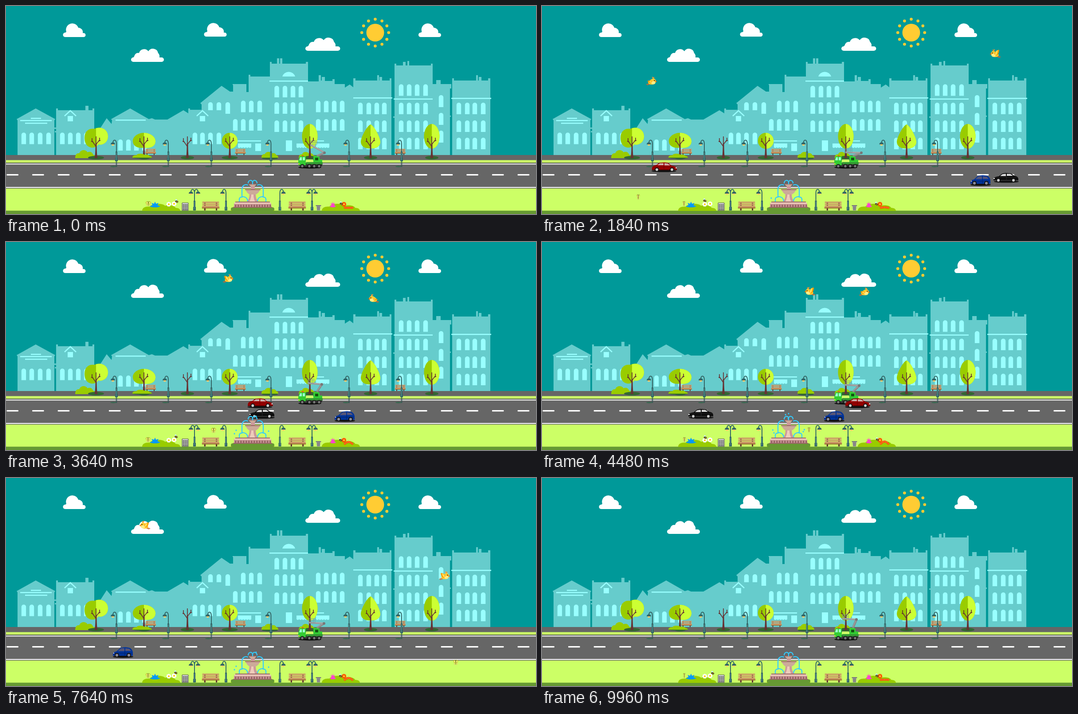
Animation, 1195 px wide and 469 px high, one loop 10 s. Source, as an HTML page with a canvas:

```html
<!DOCTYPE html>
<html lang="en">
<head>
<meta charset="utf-8">
<title>City street</title>
<style>
html, body { margin: 0; width: 100%; height: 100%; overflow: hidden; background: #099; }
canvas { display: block; }
</style>
</head>
<body>
<canvas id="stage" width="1195" height="469"></canvas>
<script>
const c = document.getElementById('stage').getContext('2d');
const LOOP = 10000, TAU = Math.PI * 2;
const WALL = '#6cc', GLASS = '#9ff', LEAF = '#9c0', LIME = '#cf3', BARK = '#633',
      IRON = '#366', SHADE = '#363', WATER = '#3cf';

// Drawing helpers
const fill = (color, d) => { c.fillStyle = color; c.fill(new Path2D(d)); };
const line = (color, w, d) => { c.strokeStyle = color; c.lineWidth = w; c.stroke(new Path2D(d)); };
const rect = (color, x, y, w, h) => { c.fillStyle = color; c.fillRect(x, y, w, h); };
function oval(color, x, y, rx, ry = rx, turn = 0) {
  c.fillStyle = color;
  c.beginPath();
  c.ellipse(x, y, rx, ry, turn, 0, TAU);
  c.fill();
}
function at(x, y, draw, sx = 1, sy = Math.abs(sx)) {
  c.save();
  c.translate(x, y);
  c.scale(sx, sy);
  draw();
  c.restore();
}
function petals(color, x, y, n, reach, r) {
  for (let i = 0; i < n; i++) {
    const a = i * TAU / n - Math.PI / 2;
    oval(color, x + reach * Math.cos(a), y + reach * Math.sin(a), r);
  }
}

// Smooth path through keys [time, ...values]
function along(keys, t) {
  let i = 0;
  while (i < keys.length - 2 && t >= keys[i + 1][0]) i++;
  const a = keys[i], b = keys[i + 1], p = keys[i - 1] || a, q = keys[i + 2] || b;
  const span = b[0] - a[0], u = (t - a[0]) / span, v = 1 - u;
  return a.slice(1).map((_, k) => {
    const j = k + 1;
    const m = (b[j] - p[j]) / (b[0] - p[0]) * span, n = (q[j] - a[j]) / (q[0] - a[0]) * span;
    return v * v * (1 + 2 * u) * a[j] + u * u * (3 - 2 * u) * b[j] + u * v * v * m - u * u * v * n;
  });
}

// Sky
function smallCloud() {
  fill('#fff', 'M5,29A5,5 0 0 1 4,19Q6,19 7,17A14,14 0 0 1 34,8A10,10 0 0 1 44,20H46A4.5,4.5 0 0 1 46,29Z');
}
function wideCloud() {
  fill('#fff', 'M5,29A5,5 0 0 1 5,19Q7,18 8,14Q11,8 18,9A12,12 0 0 1 39,5A12,12 0 0 1 61,9Q65,13 64,19H69A5,5 0 0 1 69,29Z');
}
function sky() {
  rect('#099', 0, 0, 1195, 336);
  [[129, 41], [447, 40], [930.5, 41]].forEach(([x, y]) => at(x, y, smallCloud));
  at(282, 97, wideCloud);
  at(675, 72, wideCloud, 1.06, 1);
  oval('#fc3', 832.5, 60, 20);
  petals('#fc3', 832.5, 60, 12, 30.3, 3.3);
}

// Buildings
function windows(xs, ys, h = 26) {
  c.fillStyle = GLASS;
  c.beginPath();
  for (const x of xs) for (const y of ys) c.roundRect(x - 5.2, y, 10.4, h, [5, 5, 0, 0]);
  c.fill();
}
function dormer(x) {
  line(GLASS, 2.5, `M${x - 13},248L${x},236L${x + 13},248`);
  rect(GLASS, x - 6, 248, 12, 12);
}
function city() {
  fill(WALL, 'M26,336V258L24,255L67,231L111,255L109,258V336Z');
  fill(WALL, 'M113,336V285H110V282H113V277H109V274H113V231H117V235H179V225H186V235H195V231H199V336Z');
  fill(WALL, 'M199,336V284H207L227,253L238,266L239,258L237,255L280,231L322,255L329,253L336,256H364L400,235L411,242V231H415V234H441V336Z');
  fill(WALL, 'M441,336V222L438,219L486,180L505,193H512V178H511V176H542V194H547V155H551V159H595V126H599V130H611V118H616V130H618V118H623V130H676V126H681V170H705V156H710V168H712V160H719V169H736V165H741V176H764V184L775,177L784,184V336Z');
  fill(WALL, 'M783,336V163H788V168H837V156H841V168H842V160H848V168H865V163H869V336Z');
  fill(WALL, 'M876,336V252H873V249H876V130H880V134H895V126H901V134H905V124H909V134H958V130H962V176H970V167H980V176H1004V186H1001V247H1003V250H1001V336Z');
  fill(WALL, 'M1006,336V163H1010V168H1060V156H1064V168H1066V160H1072V168H1087V163H1092V336Z');

  [[56, 252, 23], [32, 257, 71], [43, 263, 50], [247, 256, 68], [594, 168, 87],
   [783, 206, 88], [874, 208.5, 88], [1004, 207, 90], [522, 303, 53], [697, 303, 20]]
    .forEach(([x, y, w]) => rect(GLASS, x, y, w, 2.6));
  dormer(145);
  dormer(443);
  fill(GLASS, 'M623,159A15,14 0 0 1 652,159Z');

  windows([40, 58, 77, 96, 127, 145, 163, 181, 426, 443, 461, 480], [285.5]);
  windows([258, 276, 294, 312], [301], 25);
  windows([461, 480], [217], 18);
  windows([500], [217]);
  windows([535, 553, 572], [213.5]);
  windows([517, 535, 553, 572], [255]);
  windows([610.5, 629, 647, 665], [180, 217, 258]);
  windows([704, 722, 740, 758], [213.5, 255]);
  windows([799, 818, 836, 853], [218, 258, 297]);
  windows([891, 909, 927, 946], [176.5, 218, 258, 297]);
  windows([981], [201, 241, 281], 27);
  windows([1021, 1040, 1057, 1076], [218, 258, 297]);

  rect(GLASS, 562, 310, 13, 17);
  rect(GLASS, 631, 303, 14, 24);
  for (const x of [523, 655, 699]) {
    rect(GLASS, x, 310, 30, 7);
    for (let i = 0; i < 5; i++) oval(GLASS, x + 3 + i * 6, 317, 3);
  }
}

// Ground
function ground() {
  rect('#666', 0, 336, 1195, 76);
  rect('#cf6', 0, 347.5, 1195, 6);
  rect('#444', 0, 353.5, 1195, 1.2);
  rect('#fff', 0, 355.3, 1195, 2);
  rect('#fff', 0, 408, 1195, 2);
  rect('#cf6', 0, 411.5, 1195, 51);
  rect('#693', 0, 461.5, 1195, 8);
  c.fillStyle = '#fff';
  c.beginPath();
  for (let i = 0; i < 21; i++) c.roundRect(1.5 + i * 57.6, 379, 26.5, 3.2, 1);
  c.fill();
}
function bush(x, y, w, h) {
  at(x, y, () => fill(LEAF,
    'M0,0C0,-.5 .1,-.65 .2,-.6C.26,-1.1 .52,-1.1 .6,-.74C.7,-.85 .84,-.8 .88,-.42C.96,-.45 1,-.2 1,0Z'), w, h);
}
function trunk(x) {
  fill(BARK, `M${x - 3.5},343Q${x - 1.5},338 ${x - 1.3},310H${x + 1.5}Q${x + 1.7},338 ${x + 3.5},343Z`);
  line(BARK, 1.7, `M${x},313V294M${x},317L${x - 9},304V298M${x},312L${x + 8},302V297M${x - 6},307L${x - 11},305M${x + 5},305L${x + 10},303`);
}
function tree(x, crown, shadow = 15) {
  oval(SHADE, x, 342, shadow, 4);
  if (crown) {
    fill(LEAF, crown);
    c.save();
    c.beginPath();
    c.rect(x, 260, 60, 70);
    c.clip();
    fill(LIME, crown);
    c.restore();
  }
  trunk(x);
}
const ellipse = (x, y, rx, ry) => `M${x - rx},${y}a${rx},${ry} 0 1 1 ${rx * 2},0a${rx},${ry} 0 1 1 ${-rx * 2},0Z`;

function lamp() {
  line(IRON, 2, 'M0,-10V-39C0,-50 -8,-50 -8,-41');
  rect(IRON, -2, -22, 4, 22);
  rect(IRON, -3, -8, 6, 8);
  rect('#699', -1, -20, 1, 18);
  oval('#fc6', -8, -38, 3, 3);
  fill(IRON, 'M-13,-38Q-13,-42 -8,-43Q-3,-42 -3,-38Z');
}
function streetLamp(x) {
  c.globalAlpha = .7;
  rect('#355', x - 1.5, 350, 3, 13);
  oval('#264', x - 7, 362, 7, 1.4);
  c.globalAlpha = 1;
  at(x, 350, lamp);
}
function bench() {
  for (const x of [-9, 7]) rect('#633', x, -13, 2, 13);
  for (const y of [-14, -11, -8]) rect('#c96', -11.5, y, 23, 2.2);
  rect('#963', -12, -5, 24, 1.8);
  rect('#c96', -12, -6.2, 24, 1.5);
}
function greenery() {
  bush(156, 343, 46, 18);
  tree(203, 'M177,297C177,282 187,275 199,277C215,270 230,279 230,294C230,309 216,315 208,312C203,323 177,324 177,297Z', 18);
  tree(311, 'M286,306C285,294 298,286 311,286C325,286 338,295 337,306C336,318 323,322 311,319C299,322 287,317 286,306Z', 13);
  at(326, 336, bench);
  oval(SHADE, 307, 342, 22, 2);
  bush(285, 342, 44, 9);
  tree(409);
  tree(504.5, ellipse(504.5, 304, 17.7, 18), 18);
  at(528.5, 336, bench);
  oval(SHADE, 595, 343, 18, 3);
  bush(576, 342, 38, 13);
  bush(660, 343, 38, 14);
  tree(685, ellipse(685, 294, 17.5, 28));
  tree(822, 'M822,267C830,270 844,296 844,307C843,318 833,322 822,321C811,322 801,318 800,307C800,296 814,270 822,267Z');
  tree(960, ellipse(960, 294, 17.5, 28));
  at(889, 336, bench);
  [249, 366, 463, 597.5, 773.5, 892].forEach(streetLamp);
}

// Vehicles
const ARM = [[0, 718, 331, 686, 313], [640, 712, 321, 680, 318], [960, 709, 319, 676, 317],
  [1480, 715, 324, 682, 322], [1640, 717, 328, 682, 326], [1840, 720, 331, 684, 330],
  [2920, 718, 331, 686, 313], [3000, 718, 331, 686, 313]];
function wheel(x, y, r, hub) {
  oval('#111', x, y, r);
  oval(hub, x, y, r * .62);
}
function truck(t) {
  oval('#111', 685, 364, 26, 2.4);
  rect('#333', 661, 354, 52, 7);
  fill('#3c3', 'M659,359V349L662,339H676V359Z');
  fill('#9fc', 'M661,348L663,341H667V348ZM669,341H674V348H669Z');
  rect('#f33', 667, 337, 4, 2);
  rect('#cf6', 677, 346, 15, 7);
  rect('#393', 677, 352, 37, 5);
  fill('#3c3', 'M693,352V340Q700,334 707,340V346H713V352Z');
  rect('#fc3', 659, 355, 3, 2);
  rect('#151', 697, 342, 7, 6);
  for (const x of [668, 684, 695, 706]) wheel(x, 361, 4.6, '#777');
  const [ex, ey, bx, by] = along(ARM, t % 3000);
  line('#888', 5, `M701,338L${ex},${ey}`);
  line('#aaa', 1.2, `M701,336L${ex},${ey}`);
  line('#999', 3.8, `M${ex + 1},${ey}L${bx},${by}`);
  line('#bbb', 1, `M${ex},${ey - 1}L${bx},${by - 1}`);
  oval('#777', ex, ey, 3);
  line('#799', .8, `M${bx + 1},${by}v-9h14v9zm0,-5h14m-9,-4v9m5,0v-9`);
}
function sedan(paint, dark, glass) {
  return () => {
    oval('#111', -1, -2, 28, 2.6);
    fill(paint, 'M-28,-8Q-28,-14 -19,-15L-12,-20Q-9,-21.5 0,-21.5Q7,-21.5 10,-19L16,-14Q26,-13 28,-9L28,-4H-28Z');
    fill(glass, 'M-16,-15L-10,-19.5H-2V-15ZM0,-19.5Q7,-20 9,-18L13,-14.5H0Z');
    rect(dark, -28, -6, 56, 2);
    line(dark, .8, 'M-1,-15V-5M-26,-11H26');
    rect('#eee', 25, -10, 3, 2);
    wheel(-17, -5, 4.8, '#ccc');
    wheel(17, -5, 4.8, '#ccc');
  };
}
const redCar = sedan('#900', '#600', '#caa'), blackCar = sedan('#0a0a0a', '#333', '#ddd');
function blueCar() {
  oval('#111', 0, -2, 23, 2.6);
  fill('#039', 'M-22,-5V-12Q-21,-19 -15,-22Q-5,-25 6,-22L15,-14Q22,-13 23,-8V-4H-22Z');
  fill('#557', 'M-18,-15L-14,-20L-5,-21V-15ZM-3,-21Q4,-22 6,-20L12,-14.5H-3Z');
  line('#026', 1, 'M-4,-15V-5M-20,-10H21');
  rect('#cce', 20, -11, 2, 2);
  wheel(-13, -5.5, 5, '#889');
  wheel(14, -5.5, 5, '#889');
}
function traffic(t) {
  at(-28 + .1652 * t, 374, redCar);
  at(1525.5 - .2606 * t, 398, blackCar, -1);
  at(1219 - .125 * t, 405, blueCar, -1);
}

// Park
function fountain(t) {
  bush(507, 462, 22, 9);
  bush(583, 462, 22, 9);
  c.fillStyle = '#693';
  c.beginPath();
  c.roundRect(507, 454, 98, 8, 4);
  c.fill();
  rect('#c99', 514, 446, 84, 8);
  for (let i = 0; i < 14; i++) rect('#966', 516 + i * 6, 448, 3.5, 5);
  rect('#966', 512, 453, 88, 2);
  rect('#966', 517, 441, 78, 2.5);
  rect('#ecb', 515, 443, 82, 3);
  fill('#c99', 'M543,441Q549,436 549,424H563Q563,436 569,441Z');
  fill('#ecb', 'M549,441Q553,432 553,424H558Q558,436 562,441Z');
  fill('#ca9', 'M540,413H573Q570,423 562,425H550Q543,423 540,413Z');
  rect('#966', 539, 413, 35, 2);
  rect('#c99', 552, 403, 9, 10);
  fill('#ca9', 'M547,401H565Q563,407 556,407Q549,407 547,401Z');
  rect('#966', 547, 401, 18, 1.5);
  line(WATER, 2.2, 'M556,402V397C555,391 546,392 546,400M556,397C557,391 566,392 566,400'
    + 'M546,404C538,401 532,405 532,414V432M566,404C574,401 580,405 580,414V432'
    + 'M526,441V435C527,428 544,427 545,440M586,441V435C585,428 568,427 567,440');
  const phase = t % 2000, jets = [[556, 400, 26], [588, 436, 18], [524, 436, -18]];
  for (let i = 0; i < 18; i++) {
    const u = (phase - 80 - i * 62) / 750;
    if (u < 0 || u > 1) continue;
    const [x, y, push] = jets[i % 3];
    const drift = i % 3 ? push * (.3 + i % 4 * .12) : push * Math.sin(i * 1.7);
    oval(WATER, x + drift * u, y - 52 * u * (1 - u), 1.5, 1.8);
  }
}
function butterfly(t, wing = '#cc3') {
  const w = .65 + .35 * Math.cos(t / 240 * TAU);
  for (const s of [-1, 1]) {
    oval(wing, s * 3.5 * w, -2.5, 3.6 * w, 4, s * .4);
    oval('#dd6', s * 3 * w, 3, 2.8 * w, 2.8);
    oval('#ffc', s * 3.5 * w, -2.5, 1.3 * w, 1.6);
  }
  line('#663', 1, 'M0,-4V5M0,-4L-2,-7M0,-4L2,-7');
}
function bee() {
  oval('#cff', -1, -3, 2, 2.5, -.5);
  oval('#222', 0, 0, 3.4, 2.4, .4);
  line('#fc3', 1, 'M-1,-2V2M1.4,-1.5V2');
}
function daisy(x, y, color, heart) {
  petals(color, x, y, 7, 3.4, 2.1);
  oval(heart, x, y, 2.1);
}
function star(color, x, y, s) {
  at(x, y, () => fill(color, 'M0,-8L2,-3L7,-5L5,0L11,3L4,5H-4L-11,3L-5,0L-7,-5L-2,-3Z'), s, 1);
}
function garden(t) {
  bush(307, 462, 86, 16);
  bush(712, 462, 86, 16);
  const sway = Math.sin(t / 1000 * TAU);
  star('#09f', 336, 449, 1.1);
  daisy(367, 447, '#fff', '#fc0');
  daisy(379, 446, '#fff', '#fc0');
  at(321 + sway, 446, () => butterfly(t), .85);
  at(376 + 9 * Math.cos(t / 1250 * TAU), 441 + 2 * sway, bee);
  star('#f4c', 737, 449, .65);
  daisy(762, 447, '#f50', '#fc3');
  at(756 + 2 * sway, 446 - sway, bee);
  const hump = 2.5 - 2.5 * Math.cos(t / 1000 * TAU);
  for (let i = 0; i < 7; i++) {
    const y = 455 - hump * Math.sin(i / 6 * Math.PI);
    oval('#f40', 764 + i * 2.8, y, 2.4);
    oval('#fe9', 764 + i * 2.8, y, .8);
  }

  rect('#ddd', 397, 444, 14, 17);
  for (let i = 0; i < 12; i++) rect('#555', 398.5 + i % 3 * 4, 447 + Math.floor(i / 3) * 3.5, 3, 2.5);
  line('#444', 1, 'M397,444H411V461H397Z');
  fill('#999', 'M700,451H709L708,461H701Z');
  rect('#777', 698.5, 449, 12, 2);
  line('#666', .7, 'M702.5,452V460M704.5,452V460M706.5,452V460');
  at(461.5, 461, bench, 1.64, 1.43);
  at(656.5, 461, bench, 1.64, 1.43);
  [[425, -1], [425, 1], [496, 1], [617.5, -1], [690, -1], [690, 1]]
    .forEach(([x, side]) => at(x, 461, lamp, side, 1));
}

// Flyers
const RIGHTWARD = [[0, -16, 215], [1080, 130, 188], [1840, 247, 169], [2120, 254, 166], [3160, 327, 130],
  [3640, 501, 82], [4000, 614, 82], [4480, 727, 112], [5200, 755, 138], [5920, 780, 166],
  [7640, 989, 220], [9900, 1212, 215]];
const LEFTWARD = [[0, 1210, 74], [1080, 1105, 93], [1840, 1022, 107], [2120, 1000, 109], [3160, 892, 120],
  [3640, 829, 127], [4480, 604, 111], [5200, 578, 103], [5920, 550, 88], [6600, 465, 80],
  [7640, 313, 106], [8360, 215, 110], [9400, 55, 90], [9960, -16, 80]];
const FLUTTER = [[0, -10, 433], [1080, 121, 433], [1840, 217, 431], [3640, 468, 425], [4480, 602, 424],
  [5920, 817, 424], [7640, 1014, 416], [9900, 1206, 408]];

function bird(t) {
  const flap = Math.cos(t / 240 * TAU);
  line('#c63', 1.3, 'M-4,6L-12,8M-3,7L-10,9.5');
  fill('#f93', 'M2,-6L1,-10L4,-8L6,-9L6,-5Z');
  fill('#fc3', 'M-8,4Q-6,-1 0,-4Q4,-7 8,-4Q11,-1 9,4Q5,9 -1,8Q-6,8 -8,4Z');
  oval('#fe8', 4, 4, 4.5, 3.4);
  fill('#f60', 'M9,-1L12.5,1.5L9,2.5Z');
  oval('#421', 6.5, -1, 1.2);
  const tip = -3 - 5 * flap;
  fill('#f90', `M2,2Q-2,${tip - 2} -9,${tip}Q-8,4 -2,5Z`);
  fill('#fd5', `M1,2Q-2,${tip} -6,${tip + 1}Q-5,3 -1,4Z`);
}
function flyers(t) {
  at(...along(FLUTTER, t), () => butterfly(t), .9);
  at(...along(RIGHTWARD, t), () => bird(t));
  at(...along(LEFTWARD, t), () => bird(t + 80), -1);
}

const start = performance.now();
function frame() {
  const t = Math.floor((performance.now() - start) % LOOP / 40) * 40;
  sky();
  city();
  ground();
  greenery();
  truck(t);
  traffic(t);
  garden(t);
  fountain(t);
  flyers(t);
  requestAnimationFrame(frame);
}
frame();
</script>
</body>
</html>
```
